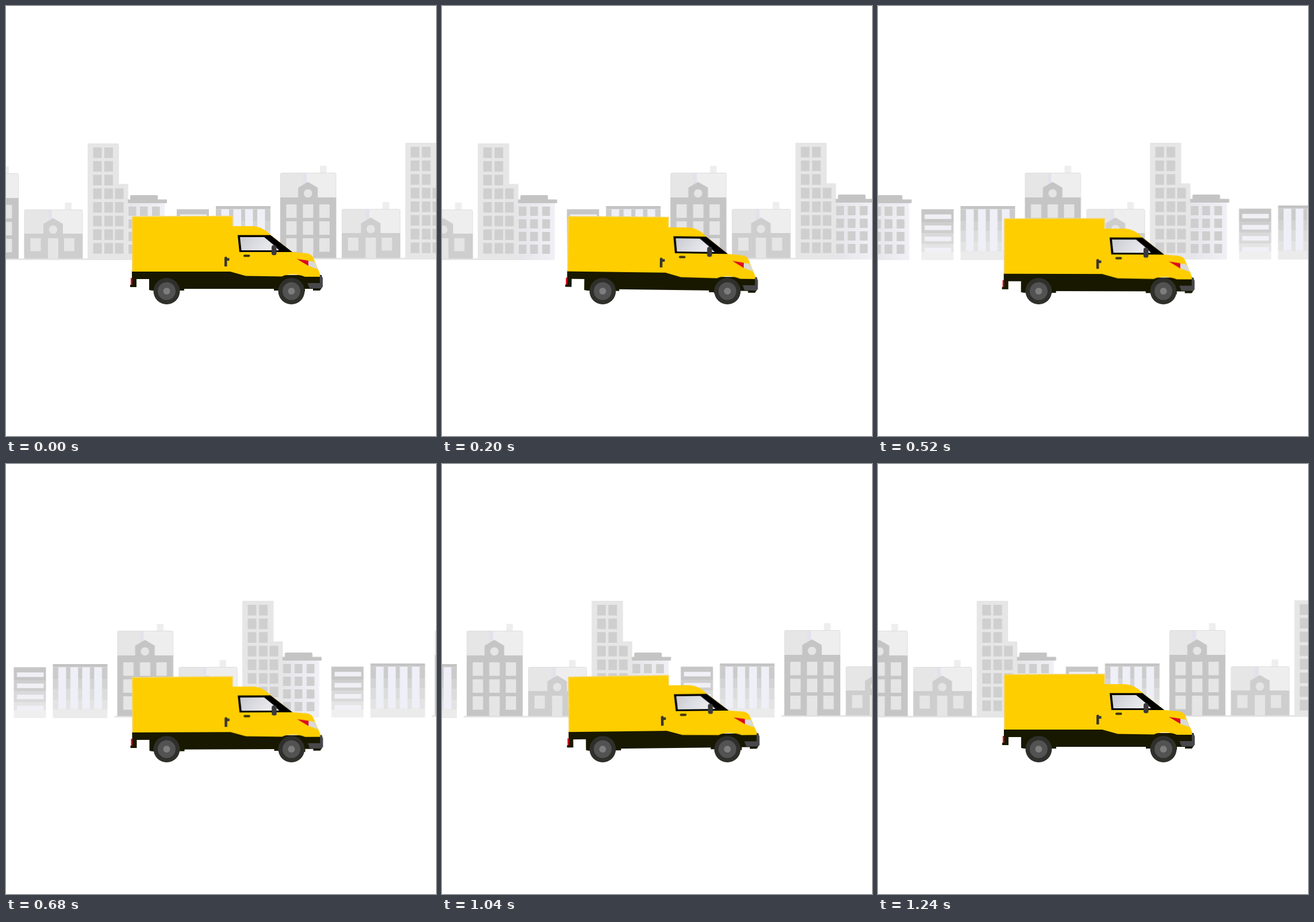
Recreate the animation shown at these times as an HTML page. Size 748 by 748 pixels, loop 1280 ms.

```html
<!DOCTYPE html>
<html lang="en">
<head>
<meta charset="utf-8">
<title>Delivery van</title>
<style>
  html, body { margin: 0; width: 100%; height: 100%; overflow: hidden; background: #fff; }
  svg { display: block; width: 100%; height: 100%; }
</style>
</head>
<body>
<svg viewBox="0 0 748 748">
  <defs>
    <linearGradient id="glass" x2="1" y2=".3">
      <stop offset="0" stop-color="#c8cad0"/>
      <stop offset=".4" stop-color="#d8d9df"/>
      <stop offset="1" stop-color="#ececf0"/>
    </linearGradient>
    <linearGradient id="facade">
      <stop offset="0" stop-color="#e5e5e9"/>
      <stop offset="1" stop-color="#f0f0f6"/>
    </linearGradient>
    <linearGradient id="roof">
      <stop offset="0" stop-color="#e6e6e6"/>
      <stop offset=".4" stop-color="#e6e6e6"/>
      <stop offset=".42" stop-color="#e2e2ec"/>
      <stop offset=".475" stop-color="#e2e2ec"/>
      <stop offset=".475" stop-color="#eee"/>
      <stop offset="1" stop-color="#eee"/>
    </linearGradient>
    <g id="block"></g>
  </defs>
  <g id="street"></g>
  <g id="van">
    <path fill="#181800" d="M219 460H392L420 468H549L551 476V488L546 495H534V492H520V497H475V495H466V492H310V495H254L249 494V475H227V489H216V485H219Z"/>
    <path fill="#e2001a" d="M217 473H219.500V485H217Z"/>
    <path fill="#ffce00" d="M219.500 366 394 365V383H430Q447 384 460 398L498 428 522 430Q531 431 534 437L545 463 548 471H520Q511 467 497 467Q486 467 480 470.500L417 469.500 390 462H219.500Z"/>
    <path fill="none" stroke="#f5d566" stroke-width="1.500" d="M220 462V366.500L394 365.500V383"/>
    <path d="M403 398.500H460L498 428H406Z"/>
    <path fill="url(#glass)" d="M407 402H449L466 416 475 425H409.500Z"/>
    <rect x="462" y="416" width="8.500" height="17.500" rx="3.500" fill="#3a3a3c"/>
    <rect x="413" y="432.500" width="11.500" height="4" rx="2" fill="#3a3210"/>
    <path fill="#36342c" d="M380 437.500Q382 435 384.500 437V438.500H388.500V443H384.500V453H380Z"/>
    <path fill="#dc0a1e" d="M506 440 526 443V452Z"/>
    <path fill="#d9d9d9" d="M526 443.500 536 444.500 543 458 526 452Z"/>
    <path fill="#48484c" d="M524.500 482H546V467L551 473V488L548 491H528Z"/>
  </g>
  <g id="wheels"></g>
</svg>
<script>
const $ = id => document.getElementById(id);
const LOOP = 1280, STEPS = 32, PERIOD = 552.5;

const rect = (x, y, w, h, fill, rx = 0) =>
  `<rect x="${x}" y="${y}" width="${w}" height="${h}" fill="${fill}" rx="${rx}"/>`;

// Windows of one size at every crossing of xs and ys
const panes = (xs, ys, w, h, fill) =>
  ys.map(y => xs.map(x => rect(x, y, w, h, fill)).join('')).join('');

const rows = (n, y, pitch) => Array.from({ length: n }, (_, i) => y + i * pitch);

function tower() {
  const ys = rows(8, 246, 23.75);
  return rect(0, 239, 54.5, 203, '#e6e6e6', 1) + rect(40, 309.5, 30.5, 132.5, '#e6e6e6', 1) +
    panes([9.5, 29], ys, 15, 18.5, '#cfcfcf') +
    panes([47.5], ys.slice(3), 15, 18.5, '#cfcfcf');
}

function office() {
  return rect(70.5, 342, 63.5, 100, 'url(#facade)') +
    rect(74, 329, 48, 9, '#c4c4c4', 2) + rect(70, 336.5, 68, 6.5, '#c4c4c4', 1) +
    panes([71, 91, 112], rows(4, 349, 22), 13.5, 16, '#cecece');
}

// Walls that get paler towards the ground
function shaded(x, w, edges, tones) {
  return tones.map((tone, i) =>
    rect(x, edges[i], w, edges[i + 1] - edges[i], tone)).join('');
}

function shops() {
  return shaded(155, 56, [353.5, 376, 395, 414, 428, 442],
      ['#c6c6c6', '#cecece', '#d9d9d9', '#e4e4e4', '#efefef']) +
    panes([160.5], rows(4, 362.5, 19.3), 46.5, 8, '#f0f0f6') +
    shaded(223, 95, [348, 353.5, 374, 391, 410, 427, 442],
      ['#c4c4c4', '#cbcbcb', '#d3d3d3', '#dcdcdc', '#e3e3e3', '#ebebeb']) +
    panes([232.5, 253.5, 274, 295], [353.5], 13.5, 73, '#efeff7');
}

function house(x, w, top, eave, wall, chimney, cols, sills, paneH) {
  const mid = x + w / 2 - .5, light = '#e5e5e5';
  return rect(chimney, top - 12, 11.5, 14, '#eee') +
    `<rect x="${x + .5}" y="${top + .5}" width="${w - 1}" height="${eave - top}" rx="2" fill="url(#roof)" stroke="#dedede"/>` +
    rect(x, eave, w, 438.5 - eave, wall) +
    `<path fill="${wall}" d="M${mid - 17} ${eave + 1}V${eave - 17}L${mid} ${eave - 27}L${mid + 17} ${eave - 17}V${eave + 1}Z"/>` +
    `<circle cx="${mid}" cy="${eave - 7}" r="7.3" fill="${light}"/>` +
    panes(cols, sills, 18, paneH, light) +
    rect(mid - 9, sills.at(-1), 18, 438.5 - sills.at(-1), light);
}

$('block').innerHTML = rect(330, 438, 223, 3, '#e6e6e6') + tower() + office() + shops() +
  house(335, 97.5, 290, 333, '#c5c5c5', 404, [345.5, 374.5, 403], [345, 374.5, 404], 23.5) +
  house(442, 102, 353, 395, '#cecece', 513, [453, 511.5], [403], 22.5);

$('street').innerHTML = [-1, 0, 1, 2].map(k =>
  `<use href="#block" x="${142 + k * PERIOD}" y="${-k}"/>`).join('');

$('wheels').innerHTML = [279.5, 496.5].map(x =>
  [[23, '#2f2f2b'], [15.5, '#525252'], [6, '#7d7d7d']].map(([r, fill]) =>
    `<circle cx="${x}" cy="496" r="${r}" fill="${fill}"/>`).join('')).join('');

// Time, sink of the rear, sink of the nose
const bounce = [
  [0, 0, 0], [200, -.4, 3.7], [360, 1.8, 4.8], [500, 3.6, 4.6], [680, 5, 3.7],
  [840, 6, 1.9], [1040, 4.2, .5], [1240, 0, 0], [1280, 0, 0]
];

function sink(t) {
  const i = bounce.findIndex(row => row[0] > t);
  const a = bounce[i - 1], b = bounce[i];
  const p = (t - a[0]) / (b[0] - a[0]);
  return [1, 2].map(c => a[c] + (b[c] - a[c]) * p);
}

function vanPose(n) {
  const [rear, nose] = sink(n * LOOP / STEPS);
  const tilt = (nose - rear) / 310;
  return `matrix(1, ${tilt}, ${-tilt}, 1, ${tilt * 366}, ${rear - tilt * 220})`;
}

// The street advances two units per step, with one now and then skipped
const streetPose = n => `translate(${-8.86 * Math.floor(1.9 * n + .3)}px, 0px)`;

function play(id, pose) {
  const frames = Array.from({ length: STEPS + 1 }, (_, n) => ({
    offset: n / STEPS,
    transform: pose(Math.min(n, STEPS - 1)),
    easing: 'steps(1, end)'
  }));
  $(id).animate(frames, { duration: LOOP, iterations: Infinity });
}

play('street', streetPose);
play('van', vanPose);
</script>
</body>
</html>
```
